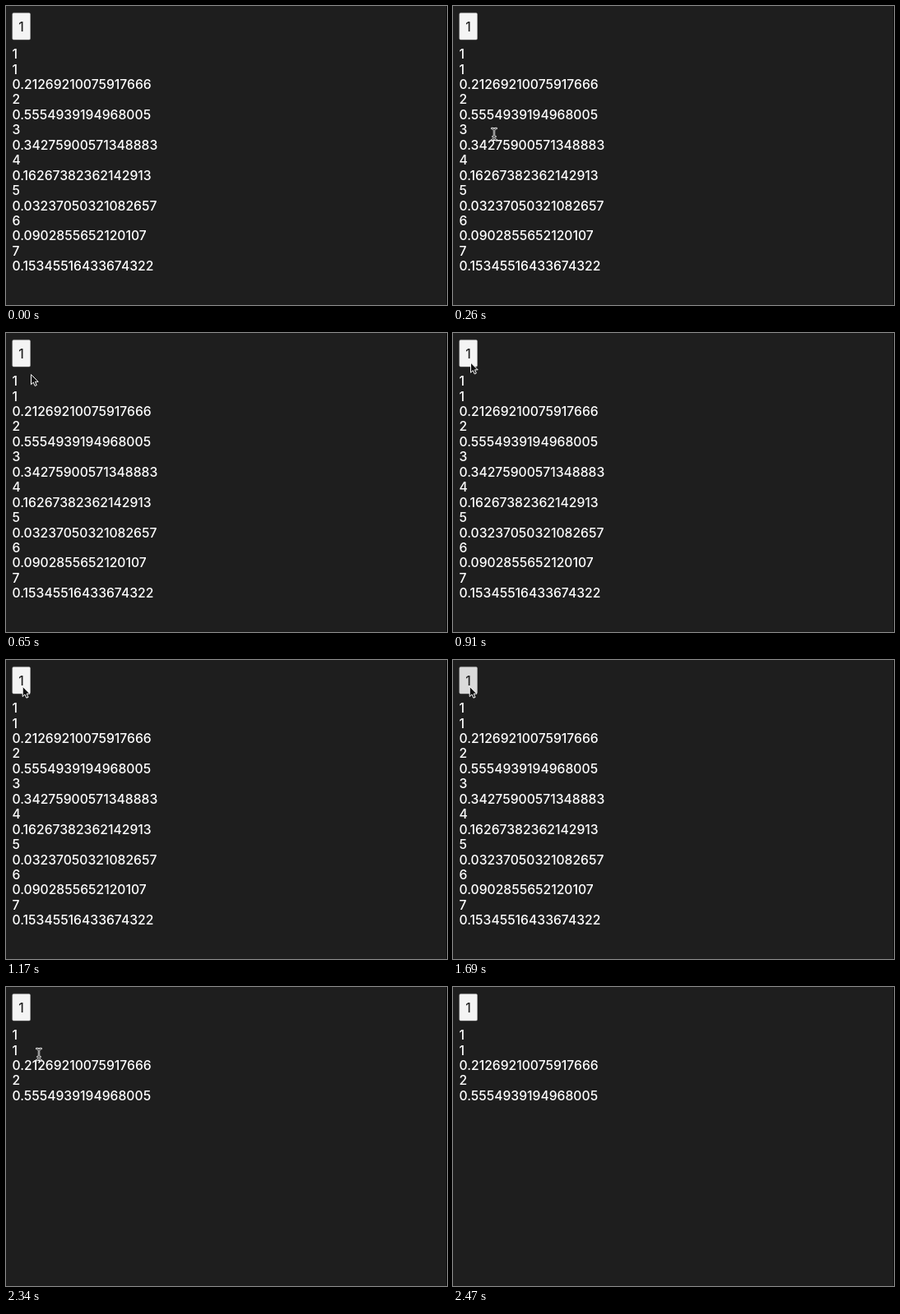
Write an HTML page that moves like this. It is 536x364 px and loops after 3.77 s.

```html
<!DOCTYPE html>
<html lang="en">
<head>
<meta charset="utf-8">
<title>Number list</title>
<style>
  html, body { margin: 0; width: 100%; height: 100%; overflow: hidden; background: #1e1e1e; }
  svg { display: block; width: 100%; height: 100%; }
  text { font: 450 15.7px Inter, sans-serif; fill: #fff; }
  #button text { fill: #222; text-anchor: middle; }
</style>
</head>
<body>
<svg viewBox="0 0 536 364">
  <defs>
    <path id="stem" d="M-2.7 -7Q0 -7 0 -5Q0 -7 2.7 -7M0 -5V5M-2.7 7Q0 7 0 5Q0 7 2.7 7M-1.5 3H1.5"/>
  </defs>
  <rect width="536" height="364" fill="#1e1e1e"/>
  <rect x="535" width="1" height="364" fill="#080808"/>
  <g id="button">
    <rect id="face" x="7.8" y="8.4" width="21.7" height="32.6" rx="1.5" stroke="#b0b0b0" stroke-width=".5"/>
    <text x="18.5" y="30.6">1</text>
  </g>
  <g id="list"></g>
  <path id="arrow" d="M0 0V12.2L2.8 9.6L4.7 13.9L6.8 13L5 8.8H8.7Z"
        fill="#111" stroke="#fff" stroke-linejoin="round"/>
  <g id="beam" fill="none" stroke-linecap="round">
    <use href="#stem" stroke="#fff" stroke-width="2.4"/>
    <use href="#stem" stroke="#222" stroke-width=".9"/>
  </g>
</svg>
<script>
const LOOP = 3770, STEP = 130, PRESS = 1690, RELEASE = 1820;
const $ = id => document.getElementById(id);

const rows = ['1', '1', '0.21269210075917666', '2', '0.5554939194968005',
  '3', '0.34275900571348883', '4', '0.16267382362142913',
  '5', '0.03237050321082657', '6', '0.0902855652120107',
  '7', '0.15345516433674322'];
const SHORT = 5;

// Pointer stops: time, shape, x, y
const stops = [
  [0, ''],
  [260, 'beam', 50, 156],
  [390, 'beam', 42, 110],
  [520, 'beam', 35, 74],
  [650, 'arrow', 30.5, 50.5],
  [780, 'arrow', 24.5, 40],
  [910, 'arrow', 21.5, 36],
  [1040, 'arrow', 20.5, 33.5],
  [1170, 'arrow', 20.2, 32.3],
  [2340, 'beam', 40, 82],
  [2470, '']
];

const lines = rows.map((value, i) => {
  const line = document.createElementNS('http://www.w3.org/2000/svg', 'text');
  line.setAttribute('x', 7.5);
  line.setAttribute('y', 64.2 + i * 18.43);
  line.textContent = value;
  return $('list').appendChild(line);
});

function show(el, on) {
  el.setAttribute('visibility', on ? 'visible' : 'hidden');
}

function render(t) {
  const [, shape, x, y] = stops.findLast(s => t >= s[0]);
  for (const id of ['arrow', 'beam']) {
    show($(id), id === shape);
    if (id === shape) $(id).setAttribute('transform', `translate(${x} ${y})`);
  }
  $('face').setAttribute('fill', t >= PRESS && t < RELEASE ? '#dadada' : '#f4f4f4');
  lines.forEach((line, i) => show(line, i < SHORT || t < RELEASE));
}

const start = performance.now();
function tick() {
  const t = (performance.now() - start) % LOOP;
  render(Math.floor(t / STEP) * STEP);
  requestAnimationFrame(tick);
}
render(0);
requestAnimationFrame(tick);
</script>
</body>
</html>
```
